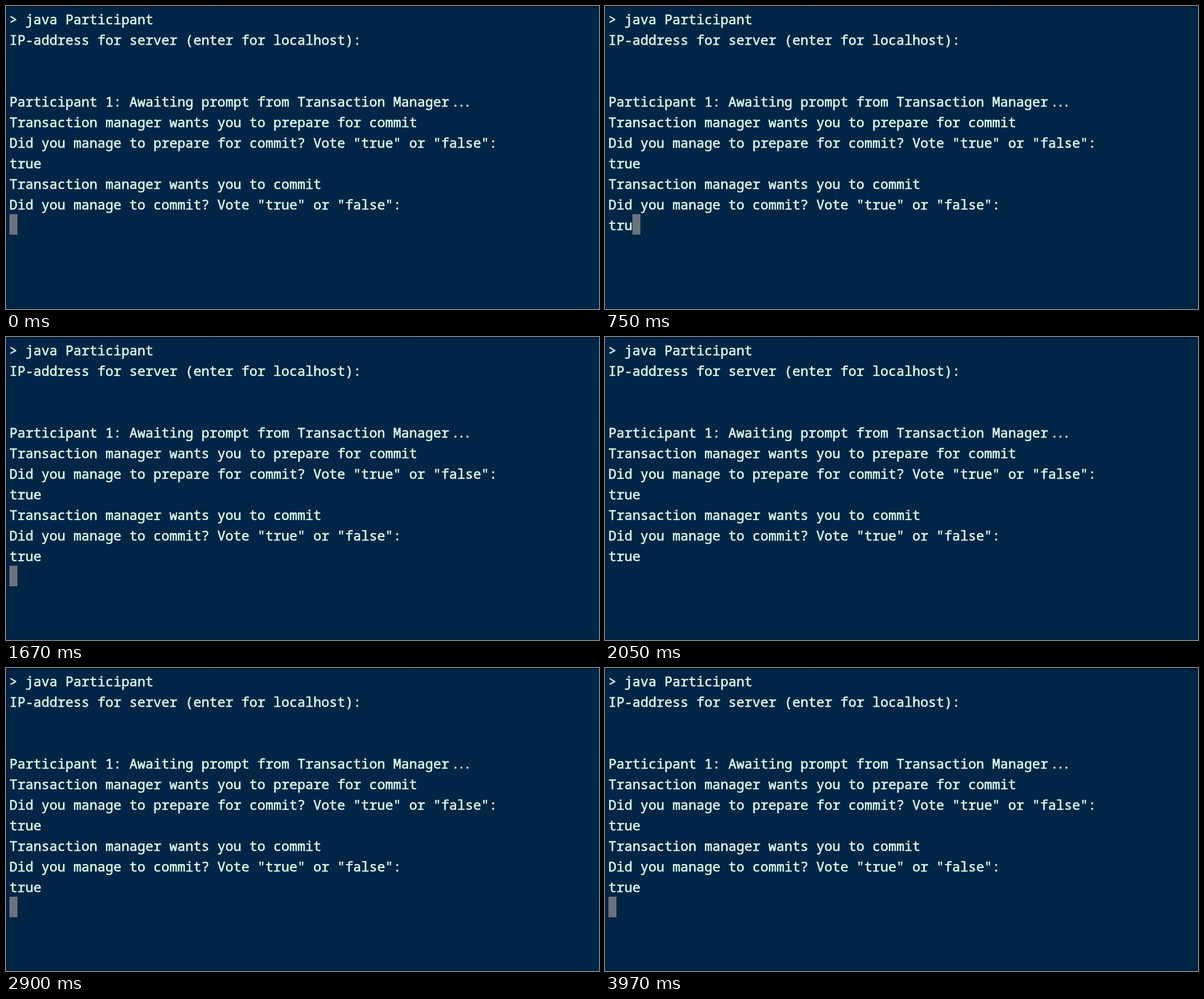
An HTML page that plays this animation: 1038 px wide and 530 px high, repeating every 4.01 s.

```html
<!DOCTYPE html>
<html lang="en">
<head>
<meta charset="utf-8">
<title>Terminal</title>
<style>
  html, body { margin: 0; width: 100%; height: 100%; overflow: hidden; background: #002546; }
  #screen { position: relative; width: 1038px; height: 530px; overflow: hidden; }
  .edge { position: absolute; left: 0; width: 100%; }
  #top { top: 0; height: 2px; background: linear-gradient(#0b1019 50%, #071a2f 50%); }
  #bottom { bottom: 0; height: 1px; background: #051a30; }
  .tick { position: absolute; top: 0; width: 2px; height: 1px; background: #1a212b; }
  pre {
    position: absolute; left: 6px; top: 5px; margin: 0;
    font: 23.333px/36px "Noto Sans Mono", monospace;
    font-variant-ligatures: none; color: #e0ffec;
    -webkit-text-stroke: 0.55px #e0ffec;
  }
  #dots { margin-left: 4px; letter-spacing: -3.5px; }
  #cursor { position: absolute; width: 14px; height: 36px; background: #6c727a; }
</style>
</head>
<body>
<div id="screen">
  <div id="top" class="edge"></div>
  <div class="tick" style="left:359px"></div>
  <div class="tick" style="left:703px"></div>
  <div id="bottom" class="edge"></div>
  <div id="cursor"></div>
  <pre>&gt; java Participant
IP-address for server (enter for localhost):


Participant 1: Awaiting prompt from Transaction Manager<span id="dots">...</span>
Transaction manager wants you to prepare for commit
Did you manage to prepare for commit? Vote "true" or "false":
true
Transaction manager wants you to commit
Did you manage to commit? Vote "true" or "false":
<span id="input"></span></pre>
</div>
<script>
  const LOOP = 4010, BLINK = 500, ANSWER = "true";
  const KEY_TIMES = [420, 540, 660, 810];
  const ENTER_TIME = 1550;
  const CELL = { width: 14, height: 36 }, ORIGIN = { x: 6, y: 4 }, INPUT_ROW = 10;
  const input = document.getElementById("input");
  const cursor = document.getElementById("cursor");

  function render(time) {
    const typed = KEY_TIMES.filter(key => key <= time).length;
    const entered = time >= ENTER_TIME;
    // Every key press restarts the blink with the cursor visible.
    const lastKey = Math.max(0, ...[...KEY_TIMES, ENTER_TIME].filter(key => key <= time));
    const visible = Math.floor((time - lastKey) / BLINK) % 2 === 0;

    input.textContent = ANSWER.slice(0, typed);
    cursor.style.left = ORIGIN.x + (entered ? 0 : typed * CELL.width) + "px";
    cursor.style.top = ORIGIN.y + (INPUT_ROW + entered) * CELL.height + "px";
    cursor.style.visibility = visible ? "visible" : "hidden";
  }

  const start = performance.now();
  function tick() {
    render((performance.now() - start) % LOOP);
    requestAnimationFrame(tick);
  }
  tick();
</script>
</body>
</html>
```
